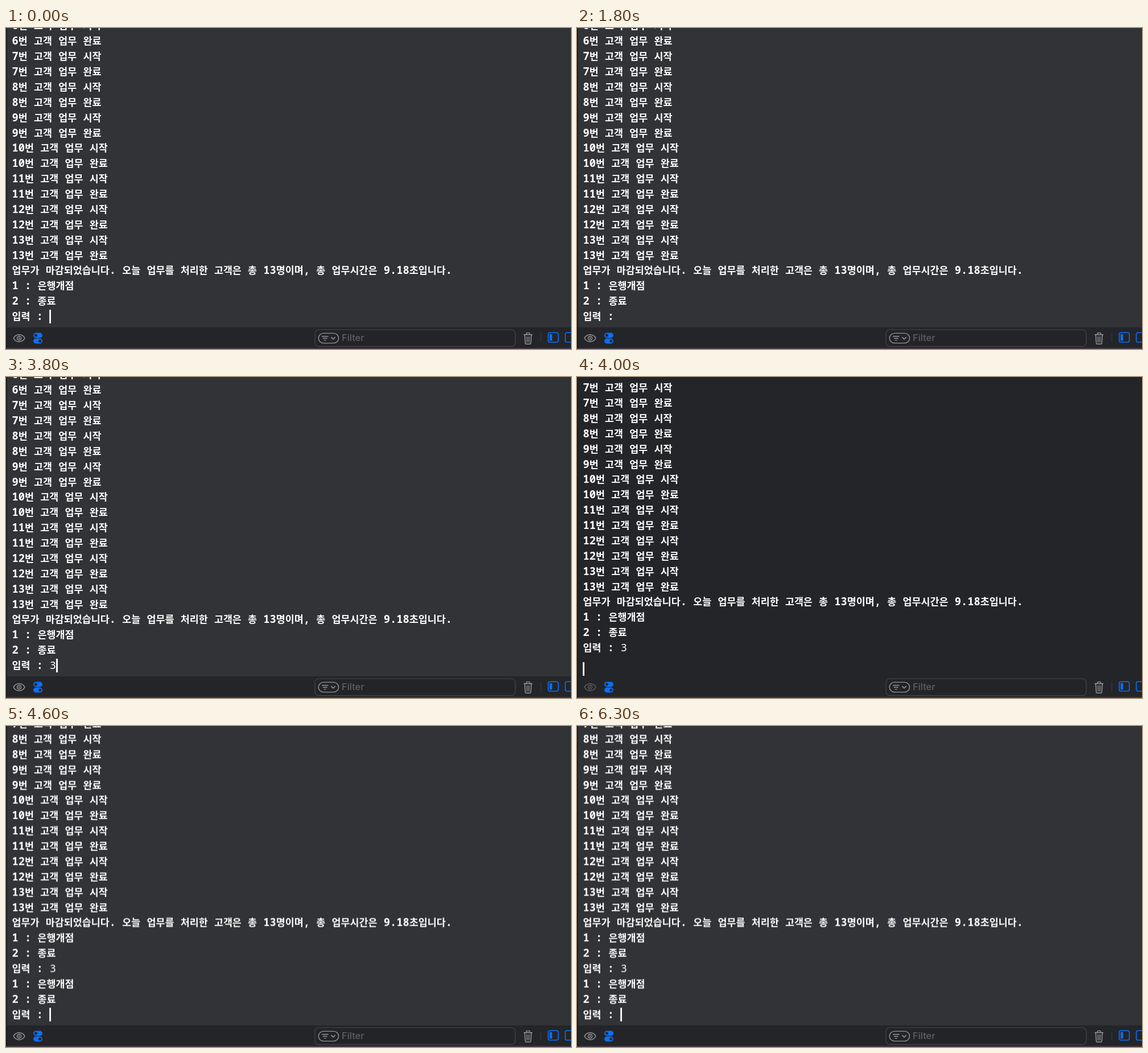
Recreate the animation shown at these times as an HTML page. Size 993x564 px, loop 8000 ms.

```html
<!DOCTYPE html>
<html lang="ko">
<head>
<meta charset="utf-8">
<title>Console</title>
<style>
html, body { margin: 0; width: 100%; height: 100%; overflow: hidden; background: #242528; }
svg { display: block; width: 993px; height: 564px; }
.log text { font: 700 18.75px "Noto Sans Mono", "DejaVu Sans Mono", monospace; fill: #fff; white-space: pre; }
.log tspan { font-family: "Noto Sans CJK KR", "Noto Sans CJK JP", "Noto Sans CJK", sans-serif; font-size: 17.39px; }
.log .typed { font-weight: 500; }
.filter { font: 500 16.4px Inter, sans-serif; fill: #5e5f62; }

.pane, .eye, .log, .typed, .reply, .caret { animation: 8s step-end infinite; }
.pane { animation-name: pane; }
.eye { animation-name: eye; }
.log { animation-name: scroll; }
.typed { animation-name: type; }
.reply { animation-name: reply; }
.caret { animation-name: caret; }

@keyframes pane {
  0%, 55%, 100% { fill: #323336; }
  50% { fill: #242528; }
  51.25% { fill: #242528; animation-timing-function: steps(3, jump-both); }
}
@keyframes eye {
  0%, 55%, 100% { opacity: 1; }
  50% { opacity: .5; }
  51.25% { opacity: .5; animation-timing-function: steps(3, jump-both); }
}
@keyframes scroll {
  0% { transform: none; }
  50% { transform: translateY(-31px); }
  57.5%, 100% { transform: translateY(-80.62px); }
}
@keyframes type { 0% { opacity: 0; } 45%, 100% { opacity: 1; } }
@keyframes reply { 0% { opacity: 0; } 57.5%, 100% { opacity: 1; } }
@keyframes caret {
  0%, 26.25% { opacity: 1; transform: none; }
  22.5%, 31.25% { opacity: 0; transform: none; }
  28.75% { opacity: .5; transform: none; }
  45% { opacity: 1; transform: translateX(11.5px); }
  50% { opacity: 1; transform: translate(-66px, 6px); }
  57.5%, 100% { opacity: 1; transform: none; }
}
</style>
</head>
<body>
<svg viewBox="0 0 993 564">
  <rect class="pane" width="993" height="526"/>
  <g class="log"></g>
  <rect class="caret" x="76.2" y="495" width="2.8" height="24" fill="#fff"/>

  <rect y="526" width="993" height="38" fill="#242528"/>
  <g class="eye" fill="none" stroke="#98999c" stroke-width="1.5">
    <path d="M13.2 545C17.5 536.7 28.7 536.7 33 545C28.7 553.3 17.5 553.3 13.2 545Z"/>
    <circle cx="23.1" cy="545" r="3.5"/>
    <circle cx="23.1" cy="545" r="1.3" fill="#98999c" stroke="none"/>
  </g>
  <g fill="#0a70fa">
    <rect x="48" y="535.6" width="16" height="8.8" rx="4.4"/>
    <rect x="48" y="545.6" width="16" height="8.8" rx="4.4"/>
    <g fill="#242528">
      <circle cx="52.4" cy="540" r="2.5"/>
      <circle cx="59.6" cy="550" r="2.5"/>
    </g>
  </g>

  <rect x="543" y="530" width="352" height="29.6" rx="7" fill="#232428" stroke="#47484b" stroke-width="1.2"/>
  <g fill="none" stroke="#929396" stroke-width="1.4" stroke-linecap="round" stroke-linejoin="round">
    <rect x="549.2" y="536.4" width="35.4" height="17.2" rx="8.6"/>
    <path d="M555.5 541.8H566M557.4 545.2H564.1M559.3 548.6H562.2"/>
    <path d="M571.8 543.6L575 546.8L578.2 543.6" stroke-width="1.6"/>
  </g>
  <text class="filter" x="590" y="550.3">Filter</text>

  <g fill="none" stroke="#98999c" stroke-width="1.4" stroke-linecap="round" stroke-linejoin="round">
    <path d="M910.3 538.8H924.7M914.5 538.5V536.9Q914.5 535.6 915.8 535.6H919.2Q920.5 535.6 920.5 536.9V538.5"/>
    <path d="M911.6 539L912.6 553.6Q912.8 555.3 914.4 555.3H920.6Q922.2 555.3 922.4 553.6L923.4 539"/>
    <path d="M914.9 542.2L915.2 552M917.5 542.2V552M920.1 542.2L919.8 552" stroke-width="1.1"/>
  </g>
  <path d="M940 536V552" stroke="#3f4043"/>
  <g fill="none" stroke="#0a70fa" stroke-width="1.6">
    <rect x="952.9" y="535.2" width="17.8" height="16.8" rx="3"/>
    <rect x="982.9" y="535.2" width="17.8" height="16.8" rx="3"/>
    <rect x="955.4" y="537.7" width="4.4" height="11.8" rx="1" fill="#0a70fa" stroke="none"/>
  </g>
  <rect y="562.4" width="993" height="1.6" fill="#4b3c49"/>
  <rect width="1.6" height="562.4" fill="#17181a"/>
</svg>
<script>
const PITCH = 26.875, PROMPT_Y = 513;
const menu = ['1 : 은행개점', '2 : 종료', '입력 :'];
const lines = [];
for (let n = 6; n <= 13; n++) lines.push(`${n}번 고객 업무 시작`, `${n}번 고객 업무 완료`);
lines.push('업무가 마감되었습니다. 오늘 업무를 처리한 고객은 총 13명이며, 총 업무시간은 9.18초입니다.', ...menu);

const row = (text, y, x = 10.6, cls = '') =>
  `<text class="${cls}" x="${x}" y="${y}">${text.replace(/[가-힣]+/g, '<tspan>$&</tspan>')}</text>`;
const last = lines.length - 1;
document.querySelector('.log').innerHTML =
  lines.map((t, i) => row(t, PROMPT_Y - (last - i) * PITCH)).join('') +
  row('3', PROMPT_Y, 76.8, 'typed') +
  `<g class="reply">${menu.map((t, i) => row(t, PROMPT_Y + (i + 1) * PITCH)).join('')}</g>`;
</script>
</body>
</html>
```
